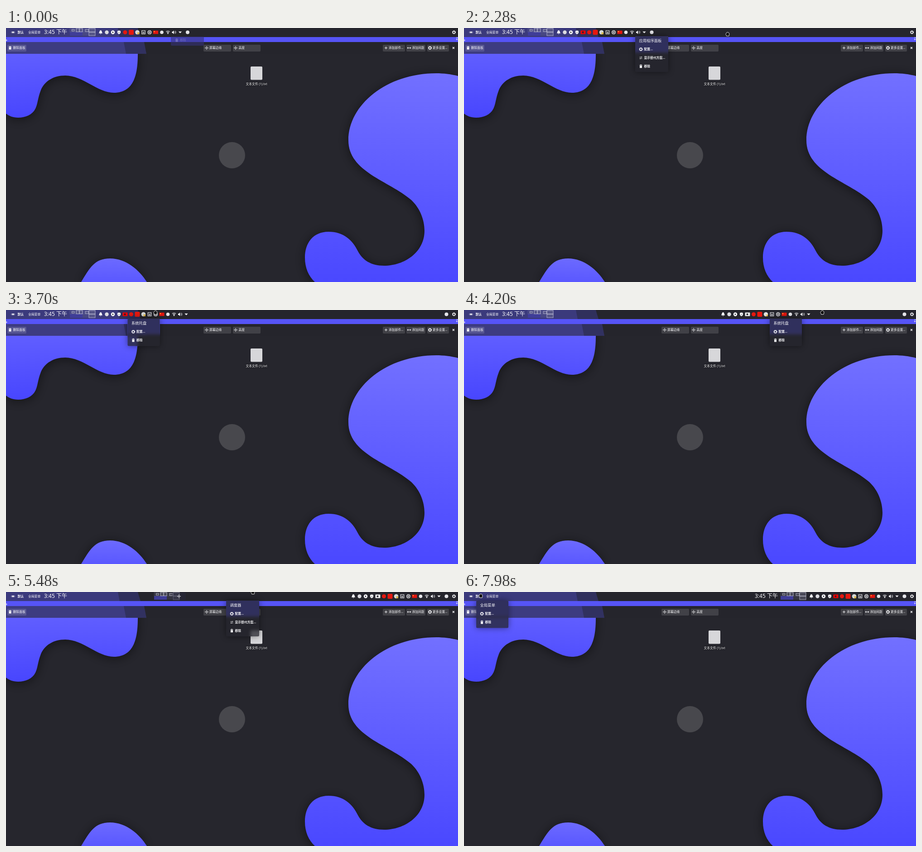
These frames come from a looping animation (998x561 px, 8000 ms). An HTML page with a canvas:

```html
<!DOCTYPE html>
<html lang="zh-CN">
<head>
<meta charset="utf-8">
<style>
html, body { margin: 0; width: 100%; height: 100%; overflow: hidden; background: #26262d; }
canvas { display: block; width: 998px; height: 561px; }
</style>
</head>
<body>
<canvas id="stage" width="998" height="561"></canvas>
<script>
const W = 998, H = 561, LOOP = 8000;
const FONT = '"Noto Sans", "Noto Sans CJK SC", "Noto Sans CJK", sans-serif';
const INK = '#fafafc', DARK = '#26262d', RED = '#e5180f', STRIP = '#5654f6';
const view = document.getElementById('stage').getContext('2d');
let c = view;

function layer(paint) {
  const canvas = document.createElement('canvas');
  canvas.width = W;
  canvas.height = H;
  c = canvas.getContext('2d');
  paint();
  c = view;
  return canvas;
}

// ---------- drawing helpers ----------
function text(s, x, y, size = 6.8, weight = 500, align = 'left') {
  c.font = `${weight} ${size}px ${FONT}`;
  c.textAlign = align;
  c.textBaseline = 'middle';
  c.fillStyle = INK;
  c.fillText(s, x, y);
}

function box(x, y, w, h, fill, r = 0) {
  c.fillStyle = fill;
  c.beginPath();
  c.roundRect(x, y, w, h, r);
  c.fill();
}

function frame(x, y, w, h, color = 'rgba(225,225,240,.8)') {
  c.strokeStyle = color;
  c.lineWidth = .8;
  c.strokeRect(x, y, w, h);
}

function disc(x, y, r, fill) {
  c.fillStyle = fill;
  c.beginPath();
  c.arc(x, y, r, 0, 7);
  c.fill();
}

function shape(d, x, y, { fill, stroke, width = 1 } = {}) {
  const path = new Path2D(d);
  c.save();
  c.translate(x, y);
  if (fill) { c.fillStyle = fill; c.fill(path, 'evenodd'); }
  if (stroke) { c.strokeStyle = stroke; c.lineWidth = width; c.stroke(path); }
  c.restore();
}

const line = (d, x, y, width = 1) => shape(d, x, y, { stroke: INK, width });
const solid = (d, x, y, fill = INK) => shape(d, x, y, { fill });

function gear(x, y) {
  c.save();
  c.strokeStyle = INK;
  c.lineWidth = 1.3;
  c.beginPath();
  c.arc(x, y, 2.5, 0, Math.PI * 2);
  c.stroke();
  c.lineWidth = 1.2;
  c.setLineDash([1.5, 1.3]);
  c.beginPath();
  c.arc(x, y, 3.5, 0, Math.PI * 2);
  c.stroke();
  c.restore();
}

const trash = (x, y) => solid('M-3-3H-1V-4H1V-3H3V-2H-3ZM-2.5-1.4H2.5V3.6H-2.5Z', x, y);
const swap = (x, y) => line('M-3-1.5H2M1-3L2.5-1.5L1 0M3 1.7H-2M-1 .3L-2.5 1.7L-1 3.2', x, y, .8);
const cross = (x, y) => {
  line('M-2 0H2M0-2V2', x, y, .8);
  solid('M-4 0L-2.4-1.4V1.4ZM4 0L2.4-1.4V1.4ZM0-4L-1.4-2.4H1.4ZM0 4L-1.4 2.4H1.4Z', x, y);
};

// ---------- static scene ----------
function blob(d, top, bottom, from, to) {
  const paint = c.createLinearGradient(0, top, 0, bottom);
  paint.addColorStop(0, from);
  paint.addColorStop(1, to);
  c.save();
  c.shadowColor = 'rgba(0,0,0,.5)';
  c.shadowBlur = 24;
  c.shadowOffsetY = 3;
  solid(d, 0, 0, paint);
  c.restore();
}

function button(x, w, label, textX, icon) {
  box(x, 37, w, 15, 'rgba(255,255,255,.13)', 2);
  icon();
  text(label, textX, 44.5);
}

const scene = layer(() => {
  box(0, 0, W, H, DARK);
  blob('M0 40H291V57C291 100 284 143 238 143C202 143 170 105 131 105C104 105 85 118 77 137C70 155 70 168 65 178C58 192 43 198 27 198C15 198 6 194 0 189Z',
    57, 198, '#605eff', '#4846fe');
  blob('M998 106C983 102 966 100 950 100C840 100 756 170 756 248C756 318 845 337 895 380C915 399 924 425 924 448C924 495 880 525 835 525C805 525 787 512 777 493C765 468 745 450 712 450C678 450 660 475 660 507C660 530 668 548 682 561H998Z',
    100, 561, '#7270ff', '#4a48ff');
  blob('M166 561C185 530 195 509 230 509C265 509 295 535 311 561Z', 509, 561, '#6c6aff', '#5a58ff');
  disc(499, 281, 29, '#48484d');

  box(540, 85, 26, 29.5, '#d7d7da', 2);
  c.save();
  c.shadowColor = '#000';
  c.shadowBlur = 3;
  text('文本文件 (1).txt', 553, 124.5, 6.8, 500, 'center');
  c.restore();

  // panel, edit strip and toolbar
  box(0, 0, W, 20, '#25252c');
  solid('M0 0H291L297 20H0Z', 0, 0, '#30305c');
  solid('M0 0H247L251 20H0Z', 0, 0, '#3b3a7c');
  box(0, 20, W, 11, STRIP);
  box(0, 31, W, 26, '#25252c');
  solid('M0 31H305L310 57H0Z', 0, 0, '#313160');
  solid('M0 31H260L265 57H0Z', 0, 0, '#3d3c80');
  line('M-1-3L1.5 0L-1 3M-2 0H3', 0, 27, .8);
  line('M-3-3H3M-3 1H3M-1-1L-3 1L-1 3', 997, 24, .8);

  button(3, 42, '删除面板', 15.5, () => trash(9, 44));
  button(436, 61, '屏幕边缘', 449, () => cross(443, 44));
  button(501, 61, '高度', 513.5, () => cross(507, 44));
  button(832, 49, '添加部件...', 845, () => line('M-3 0H3M0-3V3', 839, 44));
  button(884, 42, '添加间距', 896.5, () => {
    line('M-3 0H3', 890, 44);
    solid('M-4.5 0L-2-2V2ZM4.5 0L2-2V2Z', 890, 44);
  });
  button(930, 48, '更多设置...', 942, () => gear(936, 44));
  line('M-2-2L2 2M2-2L-2 2', 988, 44, 1.2);

  disc(15.5, 9.5, 2, INK);
  line('M-2.5-2L-3.8 0L-2.5 2M2.5-2L3.8 0L2.5 2', 15.5, 9.5, .8);
  text('默认', 25.5, 10, 6.8, 700);
  text('全局菜单', 49, 10);
  gear(989, 9.5);
});

// Menus are translucent: behind them the strip spreads down over the toolbar.
const backdrop = layer(() => {
  c.filter = 'blur(3px)';
  c.drawImage(scene, 0, 0);
  box(0, 14, W, 40, STRIP);
});

// ---------- panel items ----------
const recordIcon = (x, y, heat) => {
  const cool = Math.round(235 * (1 - heat));
  box(x - 5.5, y - 4, 11, 8, `rgb(235,${cool},${cool})`, 1);
  disc(x - .5, y, 2, DARK);
};

const trayIcons = [
  (x, y) => solid('M0-4.5C3-4 2.5 0 4 2.3H-4C-2.5 0-3-4 0-4.5ZM-1.3 3H1.3L0 4.5Z', x, y),
  (x, y) => disc(x, y, 4.2, '#dcdce0'),
  (x, y) => { disc(x, y, 4.2, INK); solid('M-1.2-2L2 0L-1.2 2Z', x, y, DARK); },
  (x, y) => { solid('M0-4L3.5-3V0C3.5 2 2 3.5 0 4.3C-2 3.5-3.5 2-3.5 0V-3Z', x, y); shape('M-1.5 0L-.3 1.2L1.7-1', x, y, { stroke: DARK, width: .8 }); },
  recordIcon,
  (x, y) => disc(x, y, 4.5, RED),
  (x, y) => box(x - 5.5, y - 5.5, 11, 11, RED, 2),
  (x, y) => { disc(x, y, 4.8, '#d5d8d6'); box(x, y, 4.5, 4.5, '#d9b64a', 1); },
  (x, y) => { line('M-3.7-3.7H3.7V3.7H-3.7Z', x, y, 1.1); line('M-2-.5H2M-2 1.6H2', x, y, 1.2); },
  (x, y) => { line('M-3-3H3V3H-3ZM-4.8-1.3H-3M-4.8 1.3H-3M3-1.3H4.8M3 1.3H4.8M-1.3-4.8V-3M1.3-4.8V-3M-1.3 3V4.8M1.3 3V4.8', x, y); box(x - 1.3, y - 1.3, 2.6, 2.6, INK); },
  (x, y) => { box(x - 5.5, y - 3.7, 11, 7.4, '#e0150f'); disc(x - 3, y - 1.4, 1.1, '#ffd83a'); },
  (x, y) => disc(x, y, 3.8, '#e4e4e8'),
  (x, y) => { line('M-4-1.5C-2-3.6 2-3.6 4-1.5M-2.4 .5C-1-1 1-1 2.4 .5', x, y, 1.1); disc(x, y + 2.4, 1.3, INK); },
  (x, y) => { solid('M-4.5-1.5H-3L-.3-4V4L-3 1.5H-4.5Z', x, y); line('M1.2-2C2.3-1 2.3 1 1.2 2M2.7-3.3C4.6-1.5 4.6 1.5 2.7 3.3', x, y, .9); },
  (x, y) => solid('M-3.7-1.8H3.7L0 2Z', x, y),
];

function tray(dx, recording, heat) {
  const icons = recording ? trayIcons : trayIcons.filter(icon => icon !== recordIcon);
  icons.forEach((icon, i) => icon(209 + dx + i * 13.5, 9.5, heat));
}

function pager(dx) {
  const x = 141 + dx;
  box(x, 1, 56, 16, 'rgba(130,130,160,.18)');
  box(x, 9, 28, 8, '#3f3d98');
  for (let i = 0; i < 4; i++) frame(x + i * 14, 1, 14, 8, 'rgba(200,200,230,.15)');
  [[4.5, 3, 5.5, 4], [14, 1, 7, 7.5], [21, 1, 7, 7.5], [34, 3, 7.5, 5], [42, 1, 14, 8], [42, 9, 14, 8]]
    .forEach(([left, top, w, h]) => {
      box(x + left, top, w, h, 'rgba(130,130,150,.25)');
      frame(x + left, top, w, h);
    });
}

function dragHandle(x, w) {
  box(x - w / 2, 1, w, 17, 'rgba(40,40,60,.55)', 2);
  cross(x, 9.5);
}

// ---------- menus ----------
const configure = [gear, '配置...'], alternatives = [swap, '显示替代方案...'], remove = [trash, '移除'];
const full = [configure, alternatives, remove], brief = [configure, remove];

// "path" holds [time, centre x] pairs; the menu fades in at "open" and out at "close".
const menus = [
  { title: '应用程序面板', items: full, open: 110, close: 3060, path: [[2450, 414.5], [2850, 921.5], [3050, 938]] },
  { title: '系统托盘', items: brief, open: 3400, close: 4450, path: [[4000, 304], [4080, 400], [4200, 710.5], [4450, 862]] },
  { title: '调度器', items: full, open: 5030, close: 5680, path: [[5230, 169], [5480, 522.5], [5680, 727]] },
  { title: '数字时钟', items: full, open: 5950, close: 7220, path: [[6680, 109], [6810, 165.5], [7200, 668]] },
  { title: '全局菜单', items: brief, open: 7600, close: 9000, path: [[0, 62.5]] },
];

const clamp = v => Math.min(1, Math.max(0, v));
const smooth = v => v * v * (3 - 2 * v);

function track(t, keys) {
  const next = keys.findIndex(key => key[0] > t);
  if (next === 0) return keys[0][1];
  if (next < 0) return keys[keys.length - 1][1];
  const [t0, v0] = keys[next - 1], [t1, v1] = keys[next];
  return v0 + (v1 - v0) * smooth((t - t0) / (t1 - t0));
}

function drawMenu({ title, items, open, close, path }, t) {
  const alpha = Math.min(clamp((t - open) / 130), clamp((close + 130 - t) / 130));
  if (!alpha) return;
  const w = items === full ? 73 : 71, h = 23 + items.length * 18.7;
  const x = track(t, path) - w / 2, y = t < 2450 ? 18 : 19;
  c.save();
  c.globalAlpha = alpha;
  c.save();
  c.shadowColor = 'rgba(0,0,0,.45)';
  c.shadowBlur = 14;
  box(x, y, w, h, DARK, 3);
  c.restore();
  c.save();
  c.clip();
  c.drawImage(backdrop, 0, 0);
  box(x, y, w, h, 'rgba(38,38,45,.76)');
  c.restore();
  text(title, x + 8.5, y + 11, 8.3);
  items.forEach(([icon, label], i) => {
    const rowY = y + 29 + i * 18.8;
    icon(x + 12.5, rowY);
    text(label, x + 19.5, rowY + .3, 6.8, 600);
  });
  c.restore();
}

function closingMenu(t) {
  c.save();
  c.globalAlpha = clamp(1 - t / 130);
  box(364, 19, 73, 20, 'rgba(52,50,120,.6)', 2);
  c.globalAlpha *= .25;
  trash(377, 27);
  text('移除', 384, 27);
  c.restore();
}

// ---------- pointer ----------
const pointerX = [[1150, 414], [1530, 578], [2350, 582], [2850, 927], [3000, 975], [3350, 330], [3950, 330],
  [4200, 791], [4450, 900], [4930, 260], [5050, 180], [5200, 180], [5480, 545], [5700, 860], [6000, 112],
  [6650, 112], [6810, 246], [7200, 750], [7560, 75], [7900, 37]];
const pointerY = [[2350, 14], [2850, 7], [4200, 6], [5100, 8], [5480, 1], [5700, 7], [6810, 7], [7900, 9]];

function pointer(t) {
  if (t < 1150) return;
  shape('M-2.5-3.5C-1.5-5 2-5 3-3.3C4.2-2.5 4 1 3 3.7H-2.5C-3-.2-4.5 1-4-1C-3.6-2-2.5-1.5-2.5-3.5Z',
    track(t, pointerX), track(t, pointerY), { fill: '#111', stroke: '#fff', width: .9 });
}

// ---------- timeline ----------
function draw(t) {
  const recording = t >= 150;
  const pulse = Math.abs((t + 700) % 1400 - 700);
  const heat = smooth(clamp((pulse - 140) / 130));
  const launcherX = track(t, [[2500, 414.5], [2850, 910.5], [3060, 972.5]]);
  const trayShift = track(t, [[3980, 0], [4080, 50], [4200, 363], [4450, 558]]);
  const pagerShift = track(t, [[5250, 0], [5480, 186], [5700, 558]]);
  const clockShift = track(t, [[6690, 0], [6810, 6], [7200, 558]]);

  c.drawImage(scene, 0, 0);
  pager(pagerShift);
  if (t > 6600 && t < 7220) box(82 + clockShift, 1, 57, 17, 'rgba(40,40,70,.6)', 2);
  text('3:45 下午', 84 + clockShift, 10, 12, 300);
  tray(trayShift, recording, heat);
  disc(recording ? launcherX : 401, 9.5, 4, '#e4e4e8');

  if (t > 2500 && t < 3080) cross(launcherX + 1, 9.5);
  if (t > 3980 && t < 4470) cross(304 + trayShift, 9.5);
  if (t > 5230 && t < 5720) dragHandle(196 + pagerShift, 30);
  if (t > 6650 && t < 7220) cross(111 + clockShift, 9.5);

  if (t < 130) closingMenu(t);
  menus.forEach(menu => drawMenu(menu, t));
  pointer(t);
}

const start = performance.now();
function tick() {
  draw((performance.now() - start) % LOOP);
  requestAnimationFrame(tick);
}
tick();
</script>
</body>
</html>
```
